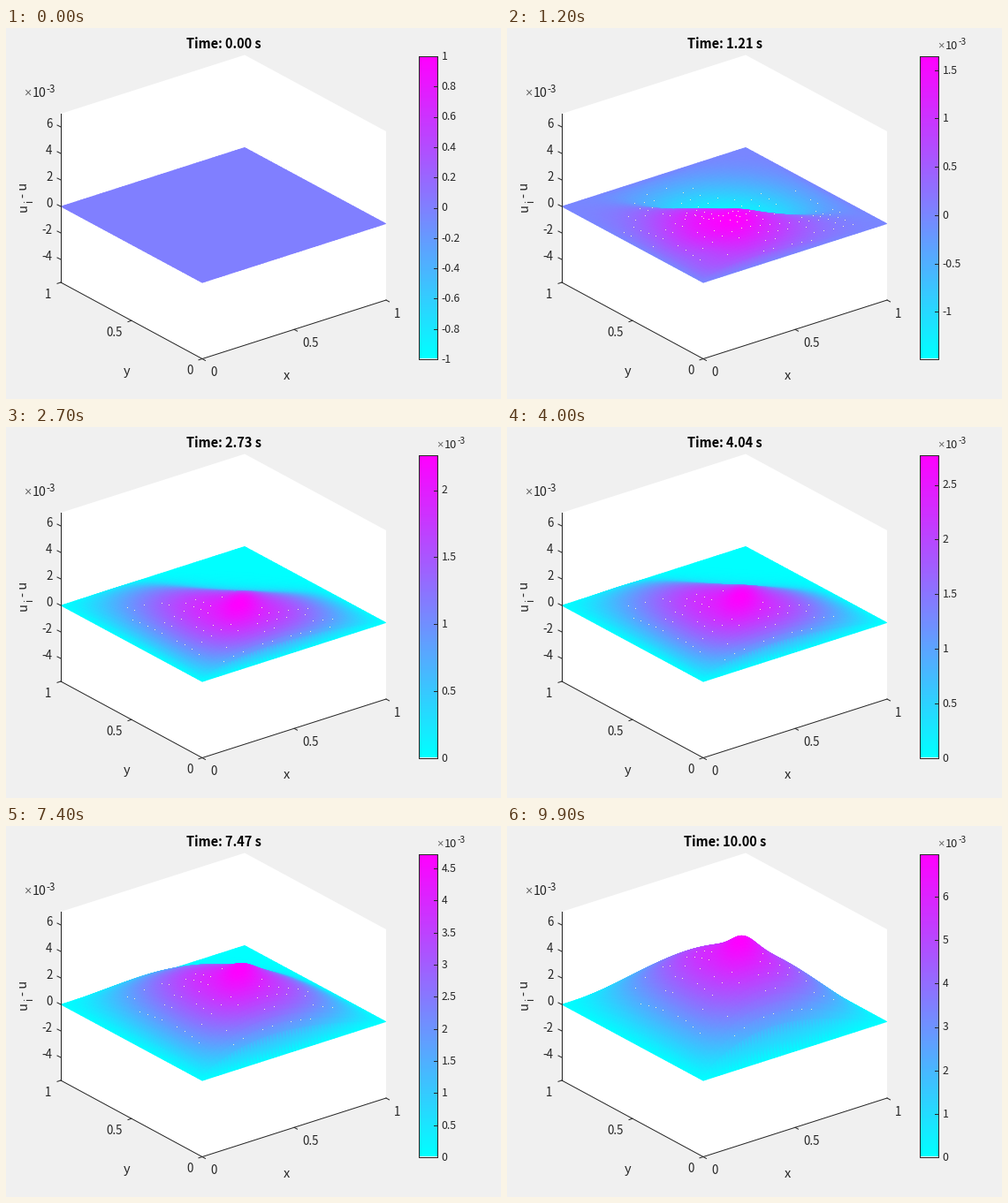
These frames come from a looping animation (560 px wide and 420 px high, 10 s). A matplotlib script:

```python
import numpy as np
import matplotlib.pyplot as plt
from matplotlib.animation import FuncAnimation

W, H, FRAMES = 560, 420, 100
INK = "#262626"
FONT = "Noto Sans CJK JP"
ZPX = 15.0  # pixels per 1e-3 of height

fig = plt.figure(figsize=(W / 100, H / 100), dpi=100, facecolor="#f0f0f0")
ax = fig.add_axes([0, 0, 1, 1])
ax.set_axis_off()


def project(x, y, z):
    return 222 + 207.5 * x - 159.5 * y, 288.1 - 66.6 * x - 86 * y - ZPX * z


def label(x, y, s, px=13.3, **kw):
    kw = {"family": FONT, "color": INK, "va": "baseline", **kw}
    return ax.text(x, y, s, fontsize=px * 0.72, **kw)


def line(xs, ys):
    return ax.plot(xs, ys, color=INK, lw=0.72, zorder=6)[0]


def exponent(x, y, px):
    return [label(x, y, "×", px, family="Liberation Sans", color="#666666"),
            label(x + 0.66 * px, y, "10", px),
            label(x + 1.78 * px, y - 0.37 * px, "-3", 0.8 * px)]


def draw_box():
    ax.fill([62, 270, 430, 430, 222, 62], [97, 30.5, 117, 308, 374.5, 288],
            color="white", lw=0, zorder=0)
    line([62, 62], [97, 288])
    line([62, 222, 430], [288, 374.5, 308])
    for z in range(-4, 7, 2):
        y = 202 - ZPX * z
        line([62, 58], [y, y - 2])
        label(52.3, y + 1.3, str(z), ha="right")
    for v in (0, 0.5, 1):
        x, y = 222 - 160 * v, 374.5 - 86.5 * v
        line([x, x - 4], [y, y + 1.3])
        label(x - 10.5, y + 17.5, f"{v:g}", ha="right")
        x, y = 222 + 208 * v, 374.5 - 66.5 * v
        line([x, x + 3.5], [y, y + 1.9])
        label(x + 9, y + 19.7, f"{v:g}")
    label(317.5, 398, "x", 14.6, ha="center")
    label(137, 393, "y", 14.6, ha="center")
    up = dict(rotation=90, rotation_mode="anchor")
    label(23.5, 207.5, "u", 14.6, **up)
    label(30, 198, "i", 11.7, **up)
    label(23.5, 191.5, "- u", 14.6, **up)
    exponent(20.5, 78, 14.3)


def draw_bar():
    ax.imshow(np.linspace(1, 0, 256)[:, None], cmap="cool", aspect="auto",
              extent=(467, 488, 374, 32), zorder=1)
    line([467, 488, 488, 467, 467], [32, 32, 375, 375, 32])


draw_box()
draw_bar()
ax.set_xlim(0, W)
ax.set_ylim(H, 0)
title = label(246.5, 23, "", 14.6, weight="bold", color="black", ha="center")

# Painter's order: the far corner comes first.
axis = np.linspace(1, 0, 58)
X, Y = np.meshgrid(axis, axis)
S, D = (X + Y) / 2, (X - Y) / 2  # along and across the line of sight
EDGE = np.sqrt(np.clip(16 * X * (1 - X) * Y * (1 - Y), 0, 1))


def arch(v, p):
    return np.clip(np.sin(np.pi * v ** p), 0, 1)


def bump(s, d, ws, wd):
    return np.exp(-((S - s) / ws) ** 2 - ((D - d) / wd) ** 2)


DOME = arch(X, 0.75) ** 1.3 * arch(Y, 0.576)


def limits(t):
    hi = 6.98 * np.exp(0.155 * (t - 10)) * (1 - 0.85 * np.exp(-1.6 * t * t))
    lo = -1.78 * max(0, 1 - t / 2.7) ** 0.3 - 4 * np.exp(-((t - 0.3) / 0.12) ** 2)
    return (lo if t < 2.7 else 0), hi


def surface(t, lo, hi):
    early = np.clip(1.4 - t, 0, 1)

    # Crest, cut off behind a front that moves away from the viewer.
    front = 0.64 - 0.62 * np.exp(-t / 0.9) + 0.5 * (t / 10) ** 4
    crest = 0.87 * DOME ** (0.65 + 0.02 * t)
    crest += 0.13 * (1 - early) * EDGE * bump(0.38, 0.07, 0.15, 0.05)
    crest /= 1 + np.exp((S - front - 1.2 * (1 - early) * D ** 2) / 0.05)
    crest *= np.exp(-early * (D / 0.13) ** 2)
    crest /= crest.max()

    # Trough ahead of it, steep towards the crest.
    center = 0.24 + 0.31 * t
    side = max(0.22, 0.6 - 0.22 * t)
    trough = EDGE * bump(center, 0, np.where(S < center, 0.09, 0.2), side)

    ripple = 0.25 * bump(center + 0.38, 0, 0.12, 1) - 1.8 * bump(0.13, 0, 0.06, 0.1)
    z = hi * (crest + early * EDGE * ripple) + lo * trough / trough.max()
    up, down = np.clip(z, 0, None), np.clip(-z, 0, None)
    return up * hi / up.max() + down * lo / max(down.max(), 1e-9)


LATTICE = np.zeros(X.shape, bool)
LATTICE[1::3, 1::3] = True
LATTICE &= np.random.default_rng(4).random(X.shape) < 0.6


def specks(px, py, z, t):
    """Tiny gaps on the slopes that face the viewer."""
    facing = np.zeros(X.shape, bool)
    facing[1:, 1:] = py[1:, 1:] > py[:-1, :-1] + 0.5
    if t < 2.4:
        spots = (EDGE > 0.35) & (D > -0.3) & (S < 0.75)
    else:
        spots = (z > 0.32 * z.max()) & (z < 0.88 * z.max()) & (S < 0.47)
    keep = LATTICE & facing & spots
    return ax.scatter(np.floor(px[keep]) + 0.5, np.floor(py[keep]) + 0.5,
                      s=0.72 ** 2, marker="s", color="#f4f2c8", lw=0, zorder=4)


def bar_ticks(lo, hi, scaled):
    span = hi - lo
    step = 1 if span > 5 else 0.5 if span > 2.05 else 0.2
    out = []
    first, last = np.ceil(lo / step - 1e-6), np.floor(hi / step + 1e-6)
    for k in np.arange(first, last + 1):
        y = 375 - 343 * (k * step - lo) / span
        out += [line([484, 488], [y, y]),
                label(492.5, y + 3.9, f"{k * step + 0.0:g}", 12.2)]
    if scaled:
        out += exponent(487.5, 395 if -lo > hi else 23.5, 12.8)
    return out


parts = []


def update(i):
    while parts:
        parts.pop().remove()
    t = 10 * i / (FRAMES - 1)
    title.set_text(f"Time: {t:.2f} s")
    lo, hi, z = -1, 1, np.zeros_like(X)
    if i:
        lo, hi = limits(t)
        z = surface(t, lo, hi)
    px, py = project(X, Y, z)
    parts.append(ax.pcolormesh(px, py, z, shading="gouraud", cmap="cool",
                               vmin=lo, vmax=hi, zorder=2))
    if i:
        parts.append(specks(px, py, z, t))
    parts.extend(bar_ticks(lo, hi, i > 0))
    ax.set_xlim(0, W)
    ax.set_ylim(H, 0)
    return parts


anim = FuncAnimation(fig, update, frames=FRAMES, init_func=lambda: [],
                     interval=100, repeat=True, repeat_delay=0, blit=False)
plt.show()
```
